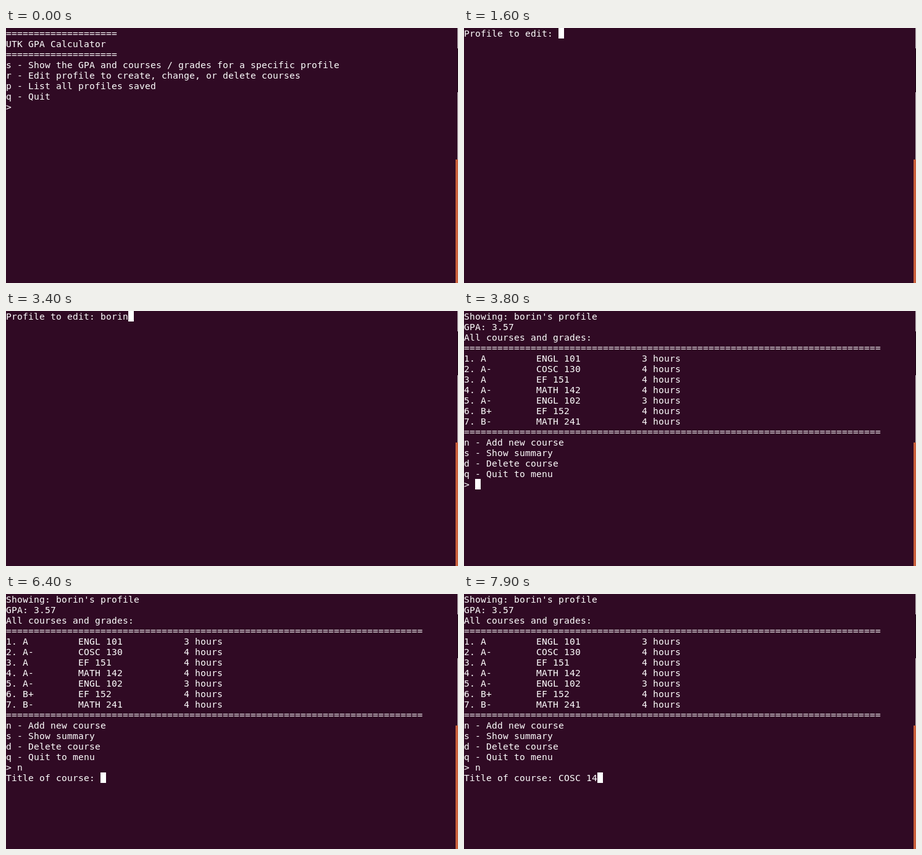
Animation of 732x413 px, one loop 8 s. Source, as an HTML page:

```html
<!DOCTYPE html>
<html lang="en">
<head>
<meta charset="utf-8">
<title>GPA Calculator</title>
<style>
  html, body { margin: 0; width: 100%; height: 100%; overflow: hidden; background: #300a24; }
  #stage { position: relative; width: 732px; height: 413px; overflow: hidden; background: #300a24; }
  #term {
    position: absolute; left: 0; top: 0; margin: 0;
    font: 14.667px/17px "DejaVu Sans Mono", monospace;
    letter-spacing: calc(9px - 1ch);
    font-variant-ligatures: none;
    color: #fff; white-space: pre;
  }
  #cursor { position: absolute; width: 9px; height: 17px; background: #fff; }
  .edge { position: absolute; right: 0; width: 1px; }
</style>
</head>
<body>
<div id="stage">
  <pre id="term"></pre>
  <div id="cursor"></div>
  <div class="edge" style="top:0;height:33px;background:#c3bcc0"></div>
  <div class="edge" style="top:33px;height:71px;background:#1c0615"></div>
  <div class="edge" style="top:104px;height:109px;background:#c3bcc0"></div>
  <div class="edge" style="top:213px;height:200px;width:4px;background:#c9603c"></div>
</div>
<script>
const CELL_W = 9, CELL_H = 17, LOOP = 8000;
const user = "borin";
const rule = n => "=".repeat(n);

const menu = [
  rule(20),
  "UTK GPA Calculator",
  rule(20),
  "s - Show the GPA and courses / grades for a specific profile",
  "r - Edit profile to create, change, or delete courses",
  "p - List all profiles saved",
  "q - Quit",
  "> "
].join("\n");

const courses = [
  ["A", "ENGL 101", 3], ["A-", "COSC 130", 4], ["A", "EF 151", 4], ["A-", "MATH 142", 4],
  ["A-", "ENGL 102", 3], ["B+", "EF 152", 4], ["B-", "MATH 241", 4]
].map(([grade, name, hours], i) =>
  `${i + 1}. ${grade.padEnd(10)}${name.padEnd(19)}${hours} hours`);

const profile = [
  `Showing: ${user}'s profile`,
  "GPA: 3.57",
  "All courses and grades:",
  rule(75),
  ...courses,
  rule(75),
  "n - Add new course",
  "s - Show summary",
  "d - Delete course",
  "q - Quit to menu",
  "> "
].join("\n");

const prompt = "Profile to edit: ";
const addCourse = profile + "n\nTitle of course: ";

// [start ms, screen, typed input, cursor visible]
const steps = [
  [0, menu, "", false],
  [600, menu, "", true],
  [1200, menu, "r", true],
  [1600, prompt, "", true],
  [2200, prompt, "", false],
  ...[2300, 2700, 2900, 3200, 3400].map((t, i) => [t, prompt, user.slice(0, i + 1), true]),
  [3800, profile, "", true],
  [4400, profile, "", false],
  [5000, profile, "", true],
  [5600, profile, "", false],
  [6100, profile, "n", true],
  [6400, addCourse, "", true],
  [7100, addCourse, "C", true],
  [7200, addCourse, "CO", true],
  [7400, addCourse, "COSC", true],
  [7600, addCourse, "COSC ", true],
  [7800, addCourse, "COSC 1", true],
  [7900, addCourse, "COSC 14", true]
];

const term = document.getElementById("term");
const cursor = document.getElementById("cursor");
let shown = null;

function show(step) {
  if (step === shown) return;
  shown = step;
  const [, screen, typed, visible] = step;
  const text = screen + typed;
  const lines = text.split("\n");
  term.textContent = text;
  cursor.style.left = lines[lines.length - 1].length * CELL_W + "px";
  cursor.style.top = (lines.length - 1) * CELL_H + "px";
  cursor.style.visibility = visible ? "visible" : "hidden";
}

const start = performance.now();
function tick() {
  const t = (performance.now() - start) % LOOP;
  show(steps.findLast(step => step[0] <= t));
  requestAnimationFrame(tick);
}
tick();
</script>
</body>
</html>
```
